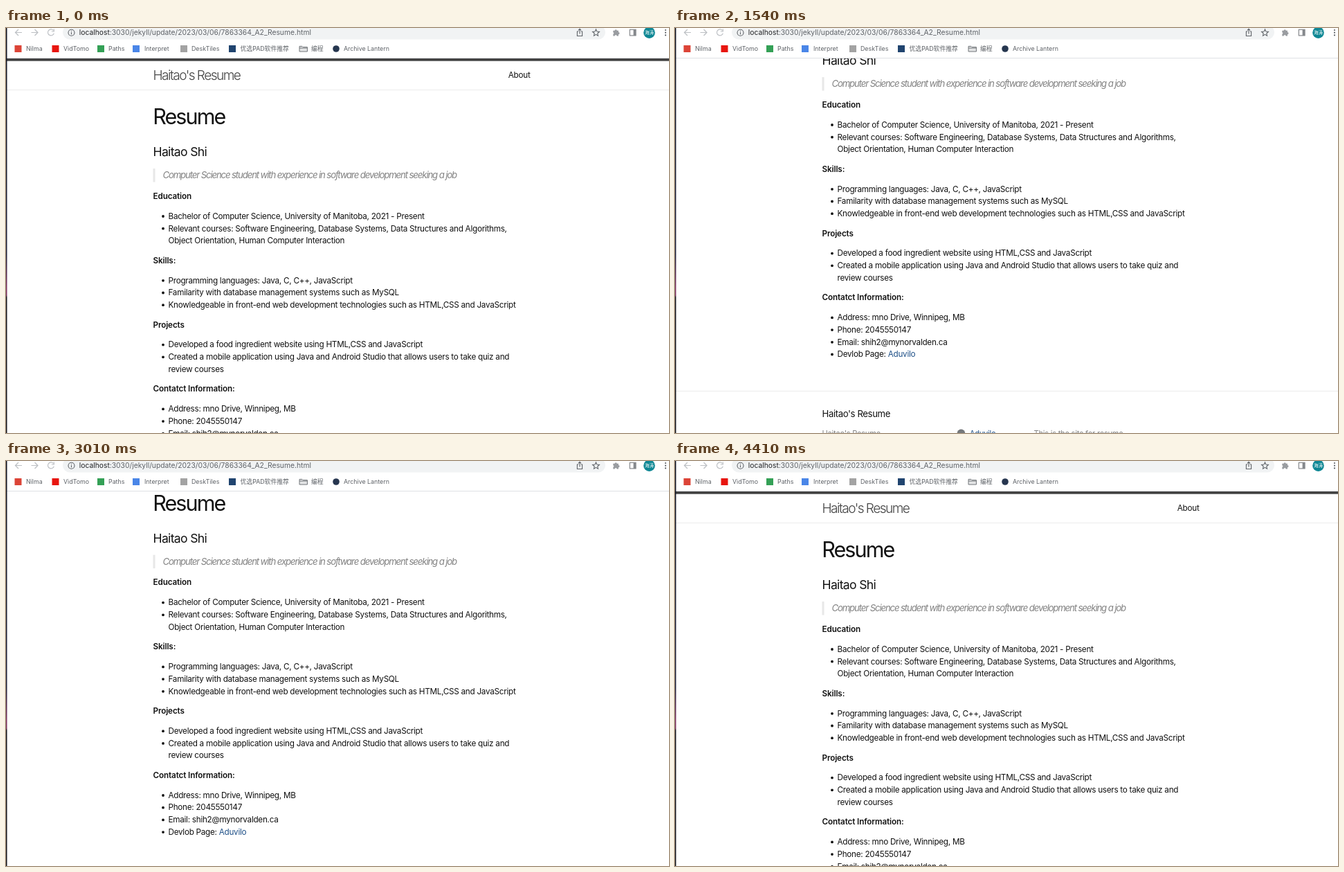
Write an HTML page that moves like this. It is 958 px wide and 585 px high and loops after 6.09 s.

```html
<!DOCTYPE html>
<html lang="en">
<head>
<meta charset="utf-8">
<title>Resume</title>
<style>
html, body { margin: 0; width: 100%; height: 100%; overflow: hidden; background: #fff; }
svg { display: block; width: 958px; height: 585px; font-family: Inter, "Noto Sans CJK SC", "Noto Sans CJK", sans-serif; }
text { white-space: pre; }
.body { font-size: 11.7px; letter-spacing: -.26px; fill: #111; }
.strong { font-size: 11.7px; letter-spacing: -.12px; font-weight: 600; fill: #111; }
.brand { font-size: 19.1px; letter-spacing: -1.55px; font-weight: 300; fill: #424242; }
.h1 { font-size: 30.5px; letter-spacing: -1.9px; fill: #111; }
.h2 { font-size: 17.6px; letter-spacing: -.68px; fill: #111; }
.quote { font-size: 13.2px; letter-spacing: -1.13px; font-style: italic; fill: #828282; }
.foot { font-size: 13.2px; letter-spacing: -.4px; fill: #111; }
.small { font-size: 11.05px; letter-spacing: -.21px; fill: #828282; }
.link { fill: #1d4f87; }
.mail { fill: #2a69b3; }
.url { font-size: 10.3px; fill: #5f6368; }
.mark { font-size: 8.84px; fill: #5f6368; }
.icon { fill: none; stroke: #5f6368; stroke-width: 1.1; }
.pale { fill: none; stroke: #bcbfc3; stroke-width: 1.2; }
</style>
</head>
<body>
<svg viewBox="0 0 958 585">
  <defs>
    <clipPath id="view"><rect y="44" width="958" height="541"/></clipPath>
    <linearGradient id="edge" x1="0" y1="0" x2="0" y2="1">
      <stop offset="0" stop-color="#10131f"/>
      <stop offset=".56" stop-color="#1d2038"/>
      <stop offset=".64" stop-color="#7a2f5c"/>
      <stop offset=".66" stop-color="#7a2f5c"/>
      <stop offset=".665" stop-color="#15151b"/>
      <stop offset="1" stop-color="#15151b"/>
    </linearGradient>
  </defs>
  <rect width="958" height="585" fill="#fff"/>
  <g clip-path="url(#view)"><g id="page"></g></g>

  <g id="chrome">
    <rect width="958" height="44" fill="#fff"/>
    <rect x="82" y="-4" width="784" height="20.6" rx="10.3" fill="#f1f3f4"/>
    <path class="pale" d="M23 6.5H13.5M18 2L13.5 6.5L18 11M36.5 6.5H46M41.5 2L46 6.5L41.5 11"/>
    <path class="pale" d="M68.4 3.4A4.5 4.5 0 1 0 69.3 7.6M69.3 1.5V5H65.8"/>
    <circle class="icon" cx="94.5" cy="6.7" r="4.5"/>
    <path class="icon" d="M94.5 6V9.2M94.5 4V5.1"/>
    <path class="icon" d="M827.2 5H825.4V11.5H832.6V5H830.8M829 8.6V1.5M826.9 3.4L829 1.3L831.1 3.4"/>
    <path class="icon" d="M852.5 1.9L853.9 5.1L857.4 5.5L854.8 7.8L855.5 11.2L852.5 9.4L849.5 11.2L850.2 7.8L847.6 5.5L851.1 5.1Z"/>
    <path d="M877.3 3.8H879.6A1.6 1.6 0 0 1 882.8 3.8H885V6A1.6 1.6 0 0 1 885 9.2V11.6H882.6A1.5 1.5 0 0 0 879.6 11.6H877.3V9A1.5 1.5 0 0 0 877.3 6.2Z" fill="#9a9da1"/>
    <rect x="901.4" y="2.3" width="8.6" height="8.6" fill="none" stroke="#85888c" stroke-width="1.2"/>
    <rect x="906.6" y="2" width="3.6" height="9" fill="#85888c"/>
    <circle cx="929.5" cy="6.7" r="8.3" fill="#0e8794"/>
    <text x="929.5" y="9.2" font-size="6.6" text-anchor="middle" fill="#fff">海涛</text>
    <g fill="#5f6368"><circle cx="953" cy="3" r="1.1"/><circle cx="953" cy="6.7" r="1.1"/><circle cx="953" cy="10.4" r="1.1"/></g>
    <text class="url" x="105.8" y="10.3"><tspan fill="#202124">localhost</tspan>:3030/jekyll/update/2023/03/06/7863364_A2_Resume.html</text>
    <path d="M424 26.4H428L429.2 27.6H435.4V34H424Z" fill="#e4e5e6" stroke="#707478"/>
    <path d="M424 29H435.4" stroke="#707478"/>
    <rect y="43" width="958" height="1" fill="#dfe1e5"/>
  </g>
  <rect width="1.5" height="585" fill="url(#edge)"/>
</svg>
<script>
const NS = 'http://www.w3.org/2000/svg';
const page = document.getElementById('page');
const chrome = document.getElementById('chrome');

function add(parent, tag, attrs, content) {
  const el = document.createElementNS(NS, tag);
  for (const k in attrs) el.setAttribute(k, attrs[k]);
  if (content) el.textContent = content;
  return parent.appendChild(el);
}
const text = (cls, x, y, s) => add(page, 'text', { class: cls, x, y }, s);
const rect = (x, y, width, height, fill) => add(page, 'rect', { x, y, width, height, fill });

// Bookmarks: label, label x, icon x, icon shape and colour
[
  ['Nilma', 29, 17.5, 'square', '#dc4437'],
  ['VidTomo', 83, 71.5, 'square', '#e8150f'],
  ['Paths', 148, 137, 'square', '#34a056'],
  ['Interpret', 200, 188, 'square', '#4a86e8'],
  ['DeskTiles', 268, 257, 'square', '#a3a3a3'],
  ['优选PAD软件推荐', 338.5, 327, 'square', '#20446f'],
  ['编程', 441, 0, ''],
  ['Archive Lantern', 488, 477, 'circle', '#26364f']
].forEach(([label, x, cx, shape, fill]) => {
  add(chrome, 'text', { class: 'mark', x, y: 33.2 }, label);
  if (shape === 'circle') add(chrome, 'circle', { cx, cy: 30, r: 4.8, fill });
  if (shape === 'square') add(chrome, 'rect', { x: cx - 5, y: 25, width: 10, height: 10, fill });
});

// Page header
rect(0, 44, 958, 3.7, '#424242');
text('brand', 212.5, 75, "Haitao's Resume");
text('body', 725.8, 72.4, 'About');
rect(0, 89, 958, .8, '#e8e8e8');

text('h1', 212.2, 139.2, 'Resume');
text('h2', 212.5, 185.3, 'Haitao Shi');
rect(212.5, 203, 3, 19.5, '#e8e8e8');
text('quote', 226.4, 217.4, 'Computer Science student with experience in software development seeking a job');

// Sections: a line starting with a space continues the item above
const step = 17.7;
[
  [246.9, 'Education', [
    'Bachelor of Computer Science, University of Manitoba, 2021 - Present',
    'Relevant courses: Software Engineering, Database Systems, Data Structures and Algorithms,',
    ' Object Orientation, Human Computer Interaction']],
  [339.7, 'Skills:', [
    'Programming languages: Java, C, C++, JavaScript',
    'Familarity with database management systems such as MySQL',
    'Knowledgeable in front-end web development technologies such as HTML,CSS and JavaScript']],
  [432.5, 'Projects', [
    'Developed a food ingredient website using HTML,CSS and JavaScript',
    'Created a mobile application using Java and Android Studio that allows users to take quiz and',
    ' review courses']],
  [525.3, 'Contatct Information:', [
    'Address: mno Drive, Winnipeg, MB',
    'Phone: 2045550147',
    'Email: shih2@mynorvalden.ca',
    'Devlob Page: |Aduvilo']]
].forEach(([top, title, lines]) => {
  text('strong', 212.5, top, title);
  lines.forEach((line, i) => {
    const y = top + 28.9 + i * step;
    const [main, link] = line.split('|');
    const el = text('body', 234.5, y, main.replace(/^ /, ''));
    if (link) add(el, 'tspan', { class: 'link' }, link);
    if (line[0] !== ' ') add(page, 'circle', { cx: 227, cy: y - 3.8, r: 1.9, fill: '#111' });
  });
});

// Page footer
rect(0, 656, 958, .8, '#e8e8e8');
text('foot', 212.5, 693.6, "Haitao's Resume");
text('small', 212.5, 722, "Haitao's Resume");
text('small mail', 212.5, 738.7, 'shih2@mynorvalden.ca');
add(page, 'circle', { cx: 413.4, cy: 717.4, r: 5.8, fill: '#75787b' });
text('small link', 425.8, 722, 'Aduvilo');
text('small', 518.5, 722, 'This is the site for resume');

// Scroll path: time in ms, offset in px; a slight bounce at the top
const path = [
  [560, 0], [840, 34], [1540, 132], [1820, 176], [2170, 178.8], [2240, 178.8],
  [3010, 67.4], [3640, -1.9], [3850, -4], [4410, 0]
];
const rate = i => (path[i + 1][1] - path[i][1]) / (path[i + 1][0] - path[i][0]);
const slopes = path.map((_, i) => {
  if (i === 0 || i === path.length - 1) return 0;
  const a = rate(i - 1), b = rate(i);
  return a * b > 0 ? 2 * a * b / (a + b) : 0;
});

function scrollAt(t) {
  const last = path.length - 1;
  if (t <= path[0][0] || t >= path[last][0]) return 0;
  const i = path.findIndex(p => p[0] > t) - 1;
  const [t0, y0] = path[i], [t1, y1] = path[i + 1];
  const h = t1 - t0, u = (t - t0) / h, v = 1 - u;
  return v * v * (1 + 2 * u) * y0 + u * u * (3 - 2 * u) * y1
    + h * u * v * (v * slopes[i] - u * slopes[i + 1]);
}

const LOOP = 6090, TICK = 70;
function draw(now) {
  const t = Math.floor((now % LOOP) / TICK) * TICK;
  page.setAttribute('transform', `matrix(1 0 0 1 0 ${(-scrollAt(t)).toFixed(2)})`);
}

let start;
function frame(now) {
  if (start === undefined) start = now;
  draw(Math.max(0, now - start));
  requestAnimationFrame(frame);
}
draw(0);
requestAnimationFrame(frame);
</script>
</body>
</html>
```
